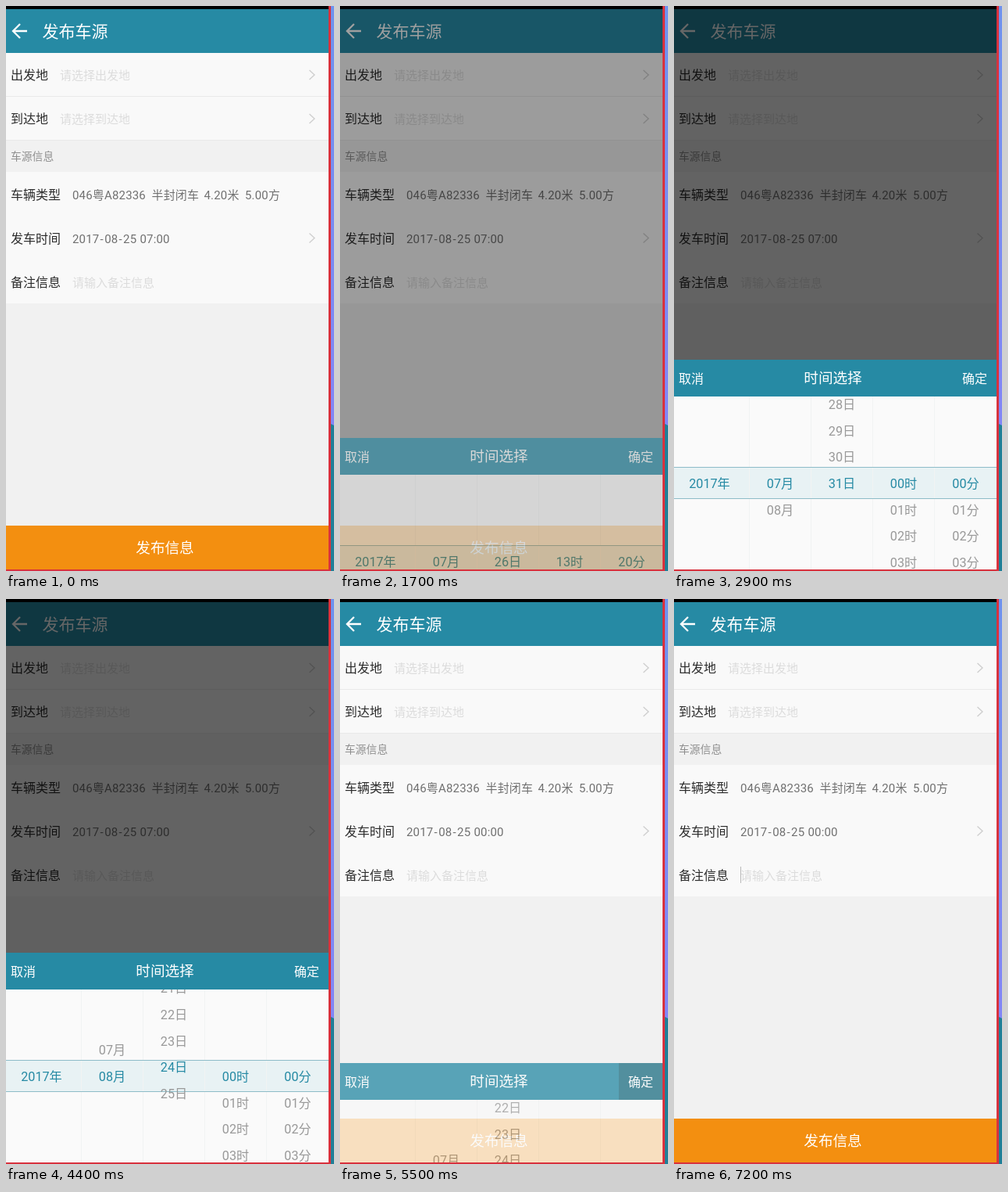
These frames come from a looping animation (420x722 px, 7600 ms). An HTML page:

```html
<!DOCTYPE html>
<html lang="zh-CN">
<head>
<meta charset="utf-8">
<title>发布车源</title>
<style>
html, body { margin: 0; width: 100%; height: 100%; overflow: hidden; background: #f1f1f1; }
svg { display: block; width: 420px; height: 722px; }
text { font-family: Roboto, "Noto Sans CJK SC", "Noto Sans CJK", sans-serif; white-space: pre; }
</style>
</head>
<body>
<svg id="stage" viewBox="0 0 420 722" xmlns="http://www.w3.org/2000/svg"></svg>
<script>
const LOOP = 7600, STEP = 100;
const TEAL = '#268aa4', MID = 206.5, ROW = 33.7, CENTER = 610;

const rect = (x, y, w, h, fill, more = '') =>
  `<rect x="${x}" y="${y}" width="${w}" height="${h}" fill="${fill}" ${more}/>`;

// y is the visual middle of the line
const text = (x, y, size, fill, str, more = '') =>
  `<text x="${x}" y="${(y + size * 0.37).toFixed(2)}" font-size="${size}" fill="${fill}" ${more}>${str}</text>`;

const mid = 'text-anchor="middle"';
const label = (y, str) => text(6, y, 16, '#2b2b2b', str);
const hint = (x, y, str) => text(x, y, 15, '#dcdcdc', str);
const value = (x, y, str, id = '') => text(x, y, 15, '#707070', str, `letter-spacing=".17" ${id}`);
const chevron = y =>
  `<path d="M388.5 ${y - 6}l6.5 6l-6.5 6" fill="none" stroke="#cfcfcf" stroke-width="1.4"/>`;

const dateText = time =>
  '2017<tspan dx="1.2">-</tspan><tspan dx="1.2">08</tspan>' +
  `<tspan dx="1.2">-</tspan><tspan dx="1.2">25</tspan><tspan dx=".3"> ${time}</tspan>`;

const page = [
  rect(0, 0, 413, 722, '#f1f1f1'),
  rect(0, 4, 413, 56, TEAL),
  '<path d="M27 32H9.500M18 23L9 32L18 41" fill="none" stroke="#fff" stroke-width="2.3"/>',
  text(46.5, 32, 21, '#fff', '发布车源'),
  rect(0, 60, 413, 112, '#f9f9f9'),
  rect(0, 115, 413, 1, '#e9e9e9'),
  rect(0, 171, 413, 1, '#e9e9e9'),
  label(88.5, '出发地'), hint(69, 88.5, '请选择出发地'), chevron(88),
  label(144.5, '到达地'), hint(69, 144.5, '请选择到达地'), chevron(144),
  text(6, 192, 13.8, '#8f8f8f', '车源信息'),
  rect(0, 212, 413, 168, '#f9f9f9'),
  label(241, '车辆类型'),
  value(85, 241, '046粤A82336'), value(186.5, 241, '半封闭车'),
  value(253.5, 241, '4.20米'), value(306, 241, '5.00方'),
  label(297, '发车时间'), value(85, 297, '', 'id="date"'), chevron(296.5),
  label(353, '备注信息'), hint(85, 353, '请输入备注信息'),
  rect(85, 342, 1, 21, '#b8b8b8', 'id="caret"'),
  rect(0, 664, 413, 56, '#f38f10'),
  text(203.5, 692.5, 18.6, '#fff', '发布信息', mid),
].join('');

const panel = [
  rect(0, 499, 413, 223, '#fafafa'),
  rect(0, 589, 413, 41, '#e8f2f4'),
  [96, 175, 254, 333].map(x => rect(x, 499, 1, 223, '#f1f3f3')).join(''),
  rect(0, 589, 413, 1, '#8dbcc8'),
  rect(0, 629, 413, 1, '#8dbcc8'),
  '<g id="wheels" clip-path="url(#body)"></g>',
  rect(0, 452, 413, 47, TEAL),
  rect(357, 452, 56, 47, '#000', 'id="press" opacity=".2"'),
  text(6, 476, 16, '#fff', '取消'),
  text(203.5, 475.5, 18.6, '#fff', '时间选择', mid),
  text(369, 476, 16, '#fff', '确定'),
].join('');

const edges = [
  rect(0, 0, 413, 4, '#000'),
  rect(416, 0, 4, 722, 'url(#side)'),
  '<path d="M416 534L420 536V722H416Z" fill="#1f7f98"/>',
  rect(413, 0, 3, 722, '#d8323e'),
  rect(0, 720, 416, 2, '#d8323e'),
].join('');

document.getElementById('stage').innerHTML =
  '<defs><clipPath id="body"><rect x="0" y="499" width="413" height="223"/></clipPath>' +
  '<linearGradient id="side" x2="0" y2="1"><stop stop-color="#6f93ee"/>' +
  '<stop offset=".7" stop-color="#8287f6"/></linearGradient></defs>' +
  page + rect(0, 4, 413, 716, '#000', 'id="dim"') + `<g id="panel">${panel}</g>` + edges;

const $ = id => document.getElementById(id);
const el = Object.fromEntries(
  ['date', 'caret', 'dim', 'panel', 'wheels', 'press'].map(id => [id, $(id)]));

// Linear track through [time, value] points
function track(t, ...pts) {
  if (t <= pts[0][0]) return pts[0][1];
  for (let i = 1; i < pts.length; i++) {
    const [t0, a] = pts[i - 1], [t1, b] = pts[i];
    if (t <= t1) return a + (b - a) * (t - t0) / (t1 - t0);
  }
  return pts[pts.length - 1][1];
}

function wheel(x, unit, lo, hi, pos) {
  let out = '';
  for (let n = Math.max(lo, Math.ceil(pos - 4)); n <= Math.min(hi, pos + 4); n++) {
    const fill = n === Math.round(pos) ? TEAL : '#999';
    out += text(x, CENTER + (n - pos) * ROW, 16.2, fill, String(n).padStart(2, '0') + unit, mid);
  }
  return out;
}

const between = (t, a, b) => t >= a && t < b;

function ease(u) {
  return u * u * (3 - 2 * u);
}

function wheels(t) {
  const july = t < 3200, moved = t >= 2900;
  const month = track(t, [3000, 7], [3200, 8]);
  const day = july
    ? 26 + 5 * ease(track(t, [2200, 0], [2900, 1]))
    : track(t, [3600, 1], [3800, 5], [4200, 20], [4400, 24.35], [4800, 25]);
  return wheel(45.5, '年', 2017, 2017, 2017) +
    wheel(136, '月', 7, 8, month) +
    wheel(215, '日', july ? 26 : 1, july ? 31 : 25, day) +
    wheel(294, '时', moved ? 0 : 13, 23, moved ? 0 : 13) +
    wheel(373.5, '分', moved ? 0 : 20, 59, moved ? 0 : 20);
}

function draw(t) {
  const enter = track(t, [1500, 0], [1600, 0.3], [1700, 0.627], [1800, 0.89], [1900, 1]);
  const leaving = t >= 5200;
  const drop = leaving
    ? track(t, [5300, 0], [5400, 48], [5500, 141], [5600, 236], [5700, 270])
    : 268 * (1 - enter);
  const alpha = leaving ? track(t, [5300, 1], [5400, 0.92], [5500, 0.75], [5600, 0.56]) : enter;
  const dim = leaving ? track(t, [5200, 0.6], [5300, 0.5], [5400, 0.2], [5500, 0]) : 0.6 * enter;
  const open = between(t, 1600, 5700);

  el.dim.setAttribute('opacity', dim);
  el.panel.setAttribute('display', open ? 'inline' : 'none');
  el.panel.setAttribute('opacity', alpha);
  el.panel.setAttribute('transform', `translate(0 ${Math.round(drop)})`);
  el.press.setAttribute('display', leaving ? 'inline' : 'none');
  el.wheels.innerHTML = open ? wheels(t) : '';
  el.date.innerHTML = dateText(t < 5300 ? '07:00' : '00:00');

  const caret = between(t, 100, 600) || between(t, 1100, 1500) ||
    between(t, 6300, 6700) || t >= 7200;
  el.caret.setAttribute('display', caret ? 'inline' : 'none');
}

const start = performance.now();
let last = -1;

function tick() {
  const elapsed = Math.max(0, performance.now() - start) % LOOP;
  const t = Math.floor(elapsed / STEP) * STEP;
  if (t !== last) draw(last = t);
  requestAnimationFrame(tick);
}
tick();
</script>
</body>
</html>
```
